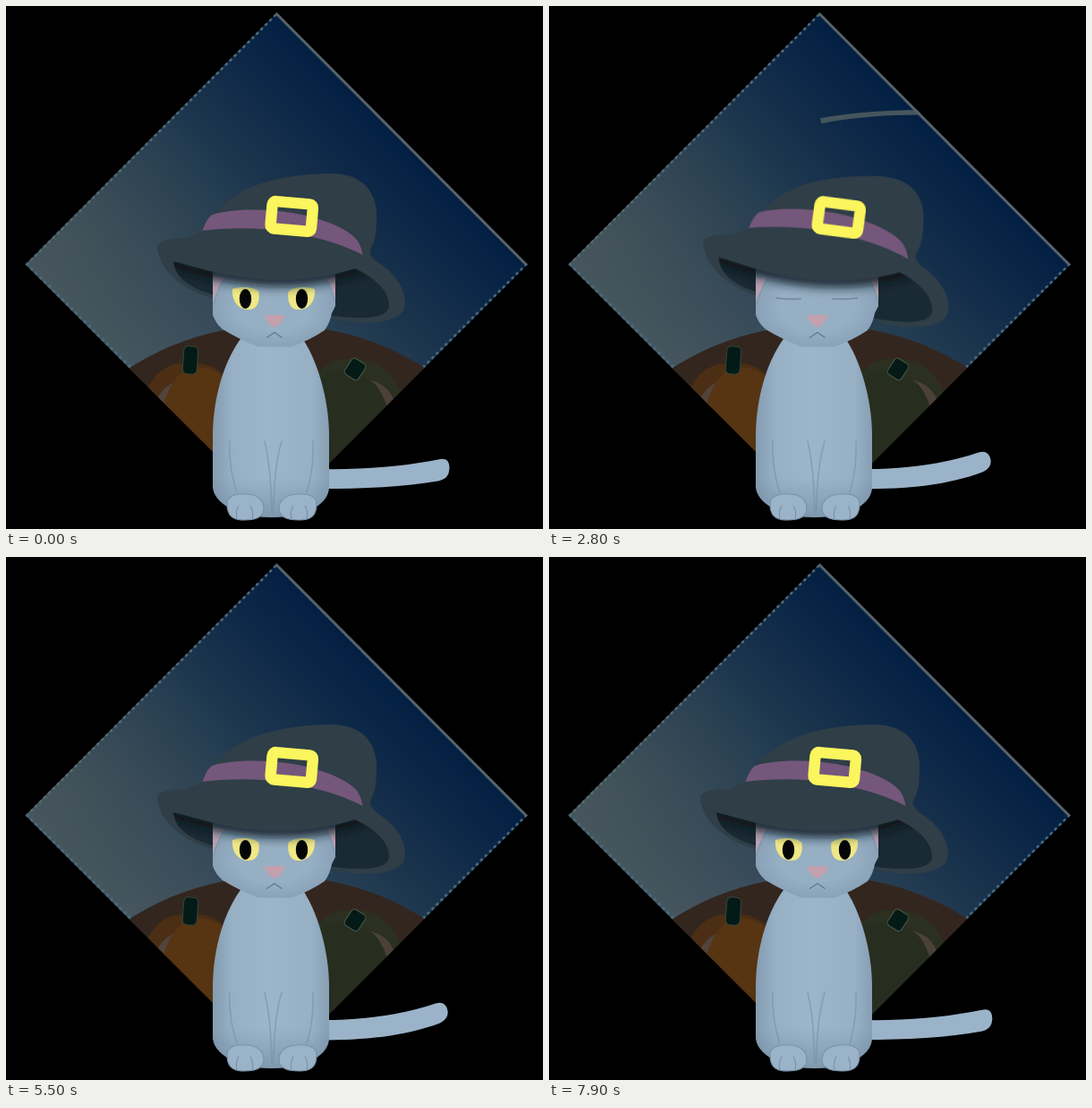
Write an HTML page that moves like this. It is 600 px wide and 584 px high and loops after 8000 ms.

```html
<!DOCTYPE html>
<html lang="en">
<head>
<meta charset="utf-8">
<title>Cat in a witch hat</title>
<style>
html, body { margin: 0; width: 100%; height: 100%; overflow: hidden; background: #000; }
svg { display: block; width: 600px; height: 584px; }

.tail { fill: #9bb3c8; animation: wag 1s cubic-bezier(.6, 0, .4, 1) -1850ms infinite alternate; }
@keyframes wag {
  from { d: path("M350 517C400 518 445 514 484 506.500Q496 504 495.500 517Q495 528 484 530.500C445 537 400 539 350 539Z"); }
  to   { d: path("M350 517C395 517.500 440 511 479 496.500Q490 493 493 504Q495 513 485 518C445 535 400 539.500 350 539.500Z"); }
}

.tilt { transform-origin: 295px 340px; animation: tilt 8s ease-in-out infinite; }
@keyframes tilt {
  0%, 11.25% { transform: rotate(0deg); }
  30%, 37.5% { transform: rotate(2.5deg); }
  50%, 100%  { transform: rotate(0deg); }
}

.eye { transform-origin: 267px 327px; animation: blink 8s linear infinite; }
@keyframes blink {
  0%, 27%    { transform: scaleY(1); }
  30%, 38.5% { transform: scaleY(0); }
  41.5%, 100% { transform: scaleY(1); }
}
.lid { fill: none; stroke: #74899d; stroke-width: 1.6; animation: lid 8s linear infinite; }
@keyframes lid {
  0%, 28.5%  { opacity: 0; }
  30%, 38.5% { opacity: 1; }
  40%, 100%  { opacity: 0; }
}

/* pathLength is 100: the front runs ahead, then the end catches up */
.reveal {
  fill: none; stroke: #fff; stroke-width: 14;
  stroke-dasharray: 100 200;
  animation: streak 8s linear infinite;
}
@keyframes streak {
  0%, 31%    { stroke-dashoffset: 100; }
  35%        { stroke-dashoffset: 75; }
  46%, 47.5% { stroke-dashoffset: 0; }
  52.5%      { stroke-dashoffset: -79.5; }
  57%, 100%  { stroke-dashoffset: -100; }
}
.fur { fill: none; stroke: #7890a6; stroke-width: 1.6; stroke-linecap: round; opacity: .6; }
</style>
</head>
<body>
<svg viewBox="0 0 600 584">
  <defs>
    <linearGradient id="sky" gradientUnits="userSpaceOnUse" x1="162" y1="428" x2="442" y2="148">
      <stop offset="0" stop-color="#475760"/>
      <stop offset=".25" stop-color="#384b5a"/>
      <stop offset=".5" stop-color="#263e52"/>
      <stop offset=".75" stop-color="#132d4a"/>
      <stop offset="1" stop-color="#021f43"/>
    </linearGradient>
    <radialGradient id="haze" gradientUnits="userSpaceOnUse" cx="60" cy="260" r="200">
      <stop offset="0" stop-color="#485654" stop-opacity=".4"/>
      <stop offset="1" stop-color="#34494c" stop-opacity="0"/>
    </radialGradient>
    <linearGradient id="coat">
      <stop offset="0" stop-color="#839cb1"/>
      <stop offset=".16" stop-color="#97afc3"/>
      <stop offset=".45" stop-color="#9cb5c9"/>
      <stop offset=".85" stop-color="#98b0c4"/>
      <stop offset="1" stop-color="#869fb4"/>
    </linearGradient>
    <linearGradient id="low" x2="0" y2="1">
      <stop offset=".78" stop-color="#68829b" stop-opacity="0"/>
      <stop offset="1" stop-color="#68829b" stop-opacity=".55"/>
    </linearGradient>
    <radialGradient id="face" r=".6">
      <stop offset=".5" stop-color="#97afc3"/>
      <stop offset="1" stop-color="#839cb2"/>
    </radialGradient>
    <filter id="soft" filterUnits="userSpaceOnUse" x="100" y="200" width="400" height="220"><feGaussianBlur stdDeviation="6"/></filter>
    <path id="diamond" d="M302.500 7L583 288.500L302.500 569L21.500 288.500Z"/>
    <path id="torso" d="M265 368C243 395 231 440 231 480V538C233 550 242 556 252 562Q296 580 342 562C352 556 360 550 361 538V480C361 440 348 394 329 368Z"/>
    <path id="skull" d="M231 292V345Q234 354 242 361Q262 373 282 380.500H319Q340 373 356 362Q362 354 364 343L368 335V292Z"/>
    <path id="under" d="M187 282C187 303 205 315 234 323L366 346C396 350 428 350 428 334C427 315 408 301 385 291Z"/>
    <path id="brim" d="M183 284C205 291 250 305 300 306C340 307 385 298 412 284"/>
    <g id="eye">
      <path d="M253 316C262 313 276 313 282.500 319C284 331 280 339 271 339C259 339 252 329 253 316Z" fill="#efe886"/>
      <ellipse cx="267.500" cy="327" rx="6.700" ry="11" fill="#050608"/>
    </g>
    <clipPath id="frame"><use href="#diamond"/></clipPath>
    <clipPath id="skullClip"><use href="#skull"/></clipPath>
    <clipPath id="underClip"><use href="#under"/></clipPath>
    <mask id="dash" maskUnits="userSpaceOnUse" x="0" y="0" width="600" height="584">
      <path class="reveal" pathLength="100" d="M416 118.500C375 118.500 335 122 302 128.500C235 142 228 290 176 328C155 342 120 350 88 354"/>
    </mask>
  </defs>

  <rect width="600" height="584"/>

  <!-- night sky and ground -->
  <g clip-path="url(#frame)">
    <use href="#diamond" fill="url(#sky)"/>
    <use href="#diamond" fill="url(#haze)"/>
    <path mask="url(#dash)" fill="#47565d"
      d="M416 116C375 116 335 119.500 302 125.500C233 139 226 289 175 327C155 340 120 349 88 353.500V354.500C120 351 155 343 177 329C231 292 238 145 303 131.500C336 124.500 375 121.500 416 121.500Z"/>
    <g fill="none" stroke-dasharray="3.500 3.500">
      <path d="M21.500 288.500L302.500 7" stroke="#566972" stroke-width="5"/>
      <path d="M21.500 288.500L140 406" stroke="#48687a" stroke-width="6"/>
      <path d="M583 288.500L465 406" stroke="#48687a" stroke-width="5"/>
    </g>
    <path d="M302.500 7L583 288.500" stroke="#596268" stroke-width="6"/>

    <circle cx="303" cy="663" r="307" fill="#33261f"/>

    <path d="M152 450C156 415 178 397 204 399C230 397 250 410 258 440V520H170Z" fill="#4b2e13"/>
    <path d="M166 446Q172 426 192 418Q178 430 178 448Z" fill="#50443d"/>
    <path d="M172 460C178 430 192 405 208 405C230 400 250 412 256 440V530H190Z" fill="#573412"/>
    <rect x="198" y="380" width="16" height="31" rx="5" transform="rotate(4 206 395)" fill="#041a16" stroke="#33463b"/>

    <path d="M338 440C342 408 360 393 386 394C420 394 440 415 446 450L380 520H340Z" fill="#2b3020"/>
    <path d="M404 417Q428 422 434 442L426 449Q422 430 404 417Z" fill="#4b4138"/>
    <path d="M342 425C358 403 386 404 402 415C420 424 424 440 424 460L360 525Z" fill="#272e20"/>
    <rect x="381" y="395" width="18" height="21" rx="4" transform="rotate(33 390 405.500)" fill="#041a16" stroke="#4a5848"/>
  </g>

  <!-- tail and body -->
  <path class="tail" d="M350 517C400 518 445 514 484 506.500Q496 504 495.500 517Q495 528 484 530.500C445 537 400 539 350 539Z"/>
  <use href="#torso" fill="url(#coat)"/>
  <use href="#torso" fill="url(#low)"/>
  <g class="fur">
    <path d="M250 486Q249 518 258 543"/>
    <path d="M289 486Q296 515 297 566"/>
    <path d="M308 486Q299 515 299 566"/>
    <path d="M343 486Q344 518 336 543"/>
  </g>
  <g fill="#9bb3c8" stroke="#7890a6" stroke-width="1.1">
    <path d="M247 556C247 547 257 544 268 545C281 545 288 552 288 561C288 571 279 574 266 574C253 574 247 569 247 556Z"/>
    <path d="M347 556C347 547 337 544 326 545C313 545 305 552 305 561C305 571 314 574 328 574C341 574 347 569 347 556Z"/>
    <path d="M258 573Q256 564 260 558M275 573Q277 564 273 558M336 573Q338 564 334 558M319 573Q317 564 321 558" fill="none"/>
  </g>

  <!-- inside of the hat -->
  <g class="tilt">
    <path d="M169 268C171 297 200 320 240 328L355 347C372 350 385 354 400 354C425 354 446 348 446 332C446 310 428 290 398 277Z" fill="#2f3e47"/>
    <use href="#under" fill="#192a35"/>
    <g clip-path="url(#underClip)">
      <use href="#brim" fill="none" stroke="#0a1219" stroke-width="14" filter="url(#soft)"/>
    </g>
  </g>

  <!-- head -->
  <use href="#skull" fill="url(#face)"/>
  <path d="M231 303H244Q236 315 231 332ZM368 303H358Q365 315 368 329Z" fill="#b9a1b0"/>
  <path d="M245 304Q237 314 232 333M357 304Q364 315 367 330" fill="none" stroke="#8098af" stroke-width="1.2"/>
  <g class="eye"><use href="#eye"/></g>
  <path class="lid" d="M253 326Q267 328 282 327"/>
  <g transform="translate(598 0) scale(-1 1)">
    <g class="eye"><use href="#eye"/></g>
    <path class="lid" d="M253 326Q267 328 282 327"/>
  </g>
  <path d="M288 346Q300 344 312 346Q308 355 300 359Q292 355 288 346Z" fill="#c4a0ae"/>
  <path d="M291 370.500L300 364.500L308.500 370.500" fill="none" stroke="#617a90" stroke-width="1.4"/>
  <g clip-path="url(#skullClip)">
    <g class="tilt">
      <use href="#brim" fill="none" stroke="#111d27" stroke-width="14" filter="url(#soft)"/>
    </g>
  </g>

  <!-- hat -->
  <g class="tilt">
    <path d="M169 270C169 263 180 259 200 259L220 252C232 225 262 202 300 194C325 188 350 187 365 187C398 188 412 206 414 230C414 246 414 261 408 270C404 279 412 281 412 284C385 298 340 307 300 306C250 305 212 291 186 285C176 284 169 278 169 270Z" fill="#2f3e47"/>
    <path d="M219.500 251C223 241 227 234 232 232.500C255 226 290 226 320 231C355 237 382 249 392 261Q397 268 398.500 278C380 268 355 260 325 254C288 247 250 247 219.500 251Z" fill="#74577b"/>
    <rect x="296.500" y="219.700" width="45.500" height="30.500" rx="4" transform="rotate(5 319.300 235)" fill="none" stroke="#fbf55e" stroke-width="12.500"/>
  </g>
</svg>
</body>
</html>
```
